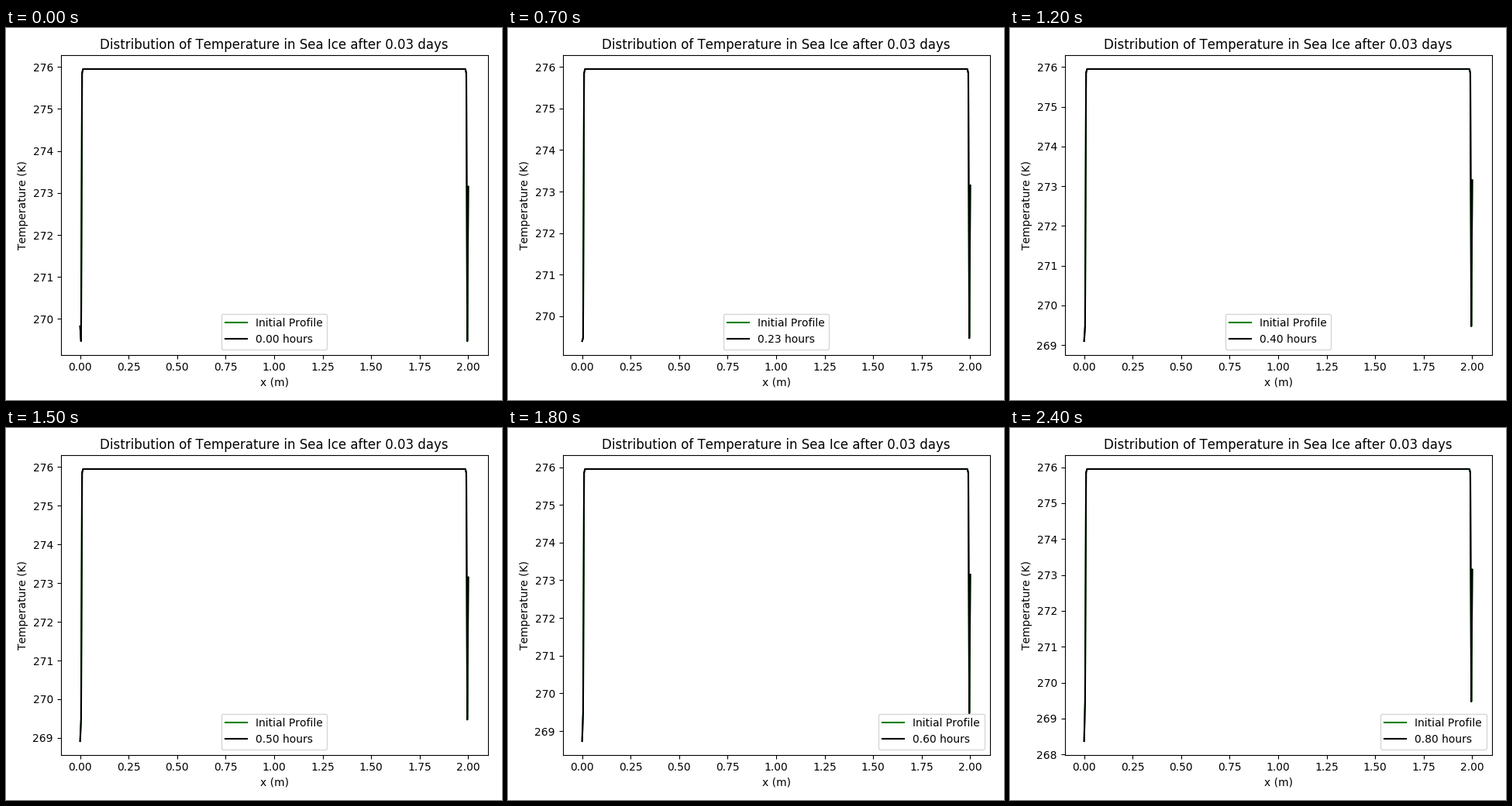
These frames come from a looping animation (640x480 px, 2500 ms). A matplotlib script:

```python
import numpy as np
import matplotlib.pyplot as plt
from matplotlib.animation import FuncAnimation
from matplotlib.ticker import MultipleLocator

W, H, DPI = 640, 480, 100
FRAMES, INTERVAL = 25, 100
STEP_HOURS = 1 / 30
BULK, EDGE, NEAR_EDGE, BASE = 275.95, 275.85, 269.473, 273.15
SURFACE_START, SURFACE_RATE = 269.825, -1.818  # K, K per hour

plt.rcParams["font.family"] = "DejaVu Sans"
plt.rcParams["text.kerning_factor"] = 6  # whole-pixel kerning

x = np.linspace(0, 2, 401)
profile = np.full_like(x, BULK)
profile[[1, -2]] = NEAR_EDGE
profile[[2, -3]] = EDGE
profile[-1] = BASE

fig, ax = plt.subplots(figsize=(W / DPI, H / DPI), dpi=DPI)
fig.subplots_adjust(left=70.6 / W, right=621.5 / W,
                    top=1 - 35.4 / H, bottom=1 - 421.6 / H)
ax.set_title("Distribution of Temperature in Sea Ice after 0.03 days")
ax.set_xlabel("x (m)")
ax.set_ylabel("Temperature (K)")
ax.set_xlim(-0.1, 2.1)
ax.xaxis.set_major_locator(MultipleLocator(0.25))
ax.yaxis.set_major_locator(MultipleLocator(1))

initial, = ax.plot(x, profile, color="green", label="Initial Profile")
current, = ax.plot(x, profile, color="black", label="0.00 hours")
legend = ax.legend(loc="lower center")


def update(i):
    hours = i * STEP_HOURS
    temp = profile.copy()
    temp[0] = SURFACE_START + SURFACE_RATE * hours
    initial.set_ydata(temp)
    current.set_ydata(temp)

    low, high = temp.min(), temp.max()
    margin = 0.05 * (high - low)
    ax.set_ylim(low - margin, high + margin)

    # The legend moves right once the dip at the base clears that corner.
    legend.set_loc("lower right" if hours > 0.58 else "lower center")
    legend.get_texts()[1].set_text(f"{hours:.2f} hours")
    return initial, current, legend


anim = FuncAnimation(fig, update, frames=FRAMES, init_func=lambda: update(0),
                     interval=INTERVAL, repeat=True, repeat_delay=0, blit=False)
plt.show()
```
